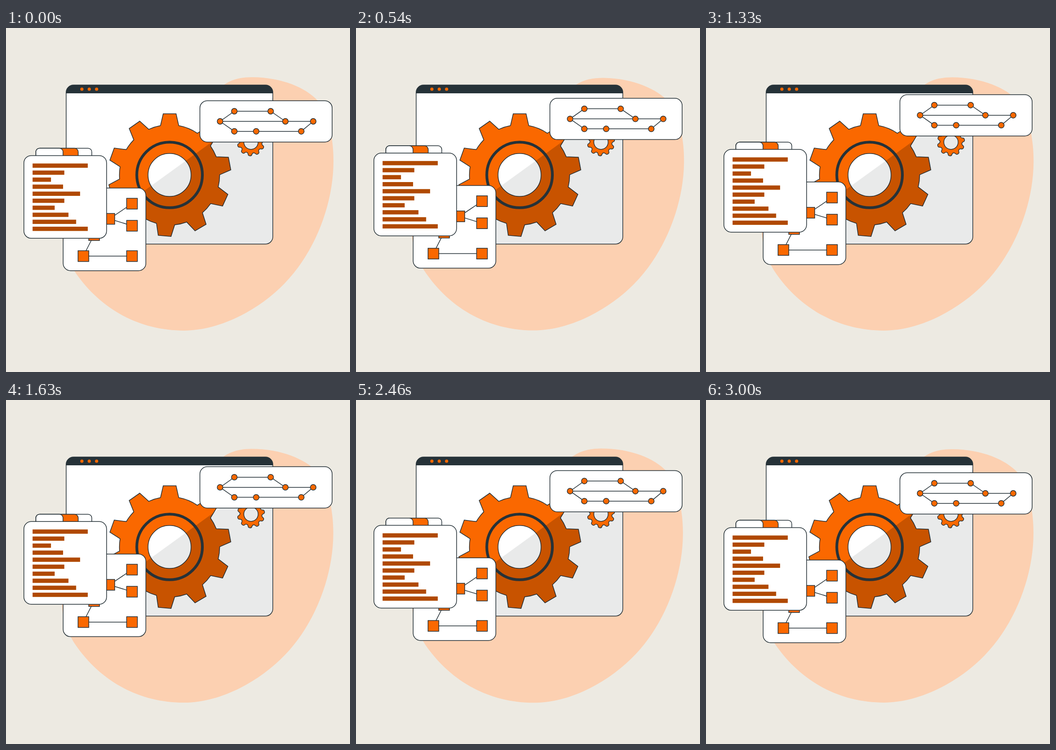
Write an HTML page that moves like this. It is 748x748 px and loops after 3040 ms.

```html
<!DOCTYPE html>
<html lang="en">
<head>
<meta charset="utf-8">
<title>Workflow</title>
<style>
  html, body { margin: 0; width: 100%; height: 100%; overflow: hidden; background: #edeae2; }
  svg { display: block; width: 100vw; height: 100vh; }
  .line { stroke: #263238; stroke-width: 1.5; }
  .white { fill: #fff; }
  .dark { fill: #263238; }
  .orange { fill: #fa6800; }
  .none { fill: none; }
</style>
</head>
<body>
<svg viewBox="0 0 748 748">
  <defs>
    <clipPath id="shade"><path d="M581 151.4V471H138.6Z"/></clipPath>
  </defs>

  <path id="blob" fill="#fcd0b1" d="M535 106.8C600 107 652 130 677 157C700 183 712 235 712 290
    C712 380 674 485 606 555C550 613 465 658 387 658C290 658 205 612 149 529
    C130 500 121 462 121 438C125 330 400 175 473 124C490 112 510 106.8 535 106.8Z"/>

  <rect class="white" x="130.8" y="124" width="449.4" height="345.8" rx="16"/>
  <rect class="dark" opacity=".1" clip-path="url(#shade)" x="130.8" y="124" width="449.4" height="345.8" rx="16"/>
  <path class="dark" d="M130.8 142V140a16 16 0 0 1 16-16H564.2a16 16 0 0 1 16 16V142Z"/>
  <rect class="line none" x="130.8" y="124" width="449.4" height="345.8" rx="16"/>
  <g class="orange">
    <circle cx="165" cy="133" r="3.5"/><circle cx="181" cy="133" r="3.5"/><circle cx="197" cy="133" r="3.5"/>
  </g>

  <path id="small" class="line orange" fill-rule="evenodd"/>
  <path id="big" class="line orange" fill-rule="evenodd"/>
  <path id="bigShade" opacity=".2" fill-rule="evenodd" clip-path="url(#shade)"/>
  <circle class="none" cx="355.7" cy="319.5" r="71.3" stroke="#263238" stroke-width="6"/>

  <g id="cards">
    <g class="line white">
      <rect x="421.6" y="158.2" width="287.6" height="89.8" rx="16"/>
      <path class="none" d="M668 203H465.5L496.5 181H575.5L607.5 203M465.5 203L496.5 224.7H642L668 203"/>
      <g id="dots" class="orange"></g>
    </g>
    <g class="line white">
      <rect x="124.3" y="348" width="179.8" height="179.7" rx="16"/>
      <path class="none" d="M274 382L225 415L274 430M191.5 450L168 496H274"/>
      <g id="boxes" class="orange"></g>
    </g>
    <g class="line white">
      <g id="tabs"></g>
      <rect x="38.9" y="277.4" width="179.8" height="179.9" rx="16"/>
    </g>
    <g id="bars" fill="#b04900"></g>
  </g>
</svg>
<script>
const $ = id => document.getElementById(id);
const polar = (cx, cy, r, deg) => {
  const a = deg * Math.PI / 180;
  return [cx + r * Math.sin(a), cy - r * Math.cos(a)];
};
const mid = (p, q) => [(p[0] + q[0]) / 2, (p[1] + q[1]) / 2];
const teeth = Array.from({ length: 10 }, (_, i) => 44.2 + 35.1 * i);
const hole = (cx, cy, r) =>
  `M${cx - r} ${cy}a${r} ${r} 0 1 0 ${2 * r} 0a${r} ${r} 0 1 0 ${-2 * r} 0Z`;

function corners(cx, cy, tip, root, tipHalf, rootHalf) {
  return teeth.map(a => [
    polar(cx, cy, root, a - rootHalf), polar(cx, cy, tip, a - tipHalf),
    polar(cx, cy, tip, a + tipHalf), polar(cx, cy, root, a + rootHalf)
  ]);
}

function sharpGear(cx, cy) {
  const r = 109;
  const parts = corners(cx, cy, 133.7, r, 6, 10.5).map(([a, b, c, d], i) =>
    `${i ? `A${r} ${r} 0 0 1 ` : 'M'}${a}L${b}L${c}L${d}`);
  return parts.join('') + `A${r} ${r} 0 0 1 ${parts[0].slice(1).split('L')[0]}Z` + hole(cx, cy, 46.8);
}

function roundGear(cx, cy) {
  const pts = corners(cx, cy, 30, 24, 7, 11).flat();
  const n = pts.length;
  return 'M' + mid(pts[n - 1], pts[0]) +
    pts.map((p, i) => `Q${p} ${mid(p, pts[(i + 1) % n])}`).join('') + 'Z' + hole(cx, cy, 15.6);
}

$('small').setAttribute('d', roundGear(532.7, 248.3));
for (const id of ['big', 'bigShade']) $(id).setAttribute('d', sharpGear(355.6, 319.5));

$('dots').innerHTML = [[465.5, 203], [496.5, 181], [575.5, 181], [607.5, 203],
  [668, 203], [496.5, 224.7], [544, 224.7], [642, 224.7]]
  .map(([x, y]) => `<circle cx="${x}" cy="${y}" r="6.2"/>`).join('');

$('boxes').innerHTML = [[274, 382], [274, 430], [274, 496], [168.3, 496], [224.7, 415], [191.6, 450.3]]
  .map(([x, y]) => `<rect x="${x - 11.7}" y="${y - 11.7}" width="23.4" height="23.4"/>`).join('');

$('tabs').innerHTML = [[186.5, 'white'], [157, 'orange'], [124, 'white']]
  .map(([x, fill]) => `<path class="${fill}" d="M65 278V269.5a8 8 0 0 1 8-8H${x - 8}a8 8 0 0 1 8 8V278Z"/>`).join('');

$('bars').innerHTML = [120, 69, 40, 66.3, 103.3, 69, 48, 78, 94.7, 120]
  .map((w, i) => `<rect x="57.8" y="${294.6 + 15.27 * i}" width="${w}" height="9.3"/>`).join('');

// Both motions are linear with a 3 s period, shown at 24 frames per second.
function draw(now) {
  const frame = Math.min(72, Math.floor((now % 3040 + 4) * 24 / 1000));
  const p = (frame / 72 + 0.01) % 1;
  const lift = 14.96 * (1 - Math.abs(1 - 2 * p));
  const tilt = p < 0.25 ? 4 * p : p < 0.75 ? 2 - 4 * p : 4 * p - 4;
  $('cards').setAttribute('transform', `translate(0 ${0.3 - lift})`);
  $('blob').setAttribute('transform', `rotate(${tilt} 415 382)`);
}
const start = performance.now();
function tick() {
  draw(performance.now() - start);
  requestAnimationFrame(tick);
}
tick();
</script>
</body>
</html>
```
